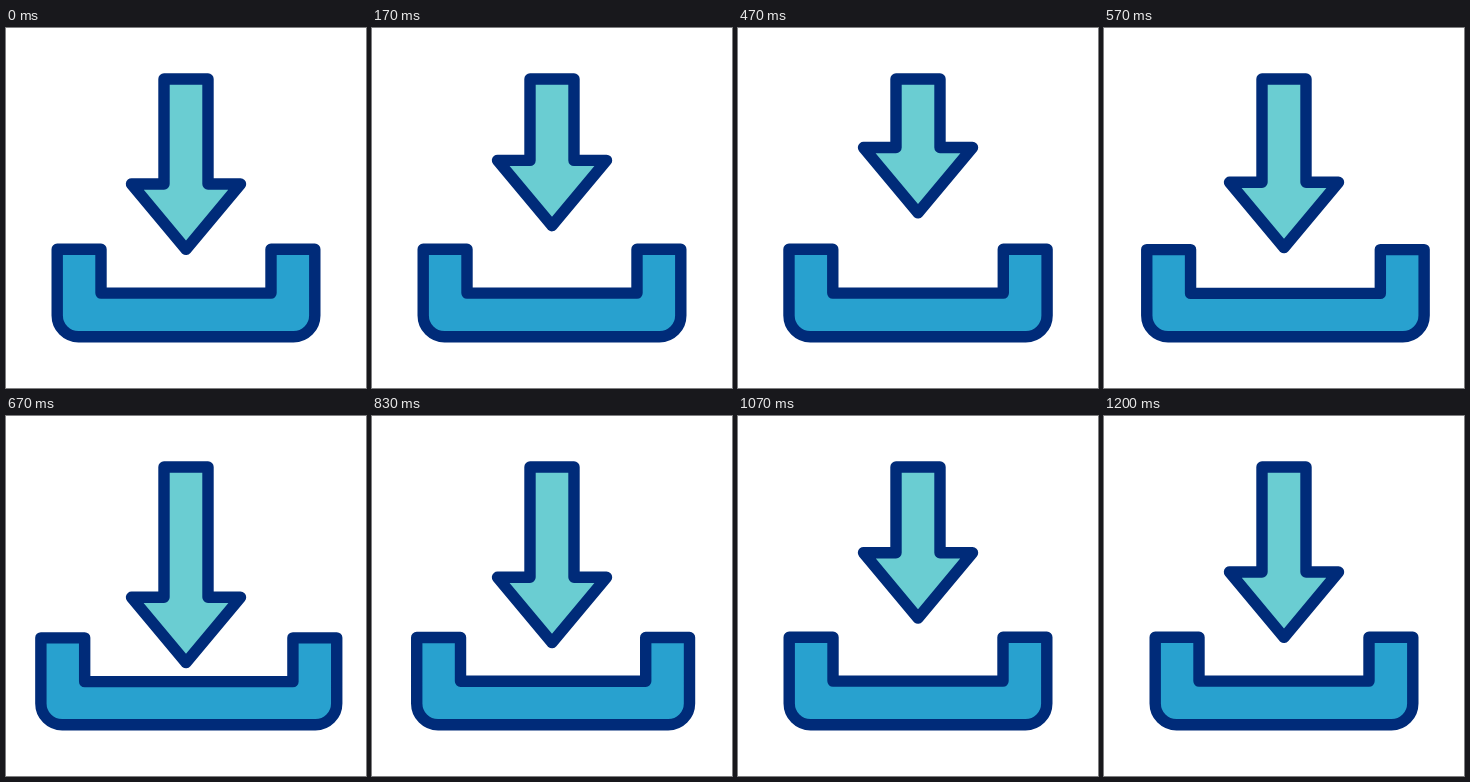
An HTML page that plays this animation: 360 by 360 pixels, repeating every 1500 ms.

```html
<!DOCTYPE html>
<html>
<head>
<meta charset="utf-8">
<title>Download icon</title>
<style>
  html, body { margin: 0; width: 100%; height: 100%; overflow: hidden; background: #fff; }
  svg { display: block; width: 100vw; height: 100vh; }
  path { stroke: #002b79; stroke-width: 11.4; stroke-linejoin: round; }
</style>
</head>
<body>
<svg viewBox="0 0 360 360">
  <path id="tray" fill="#28a1cf"/>
  <path id="arrow" fill="#6acdd2"/>
</svg>
<script>
const LOOP = 1500, STEP = 100 / 3, LAST_STEP = 36;
const tray = document.getElementById('tray');
const arrow = document.getElementById('arrow');

const easeOut = p => Math.sin(p * Math.PI / 2);
const easeInOut = p => (1 - Math.cos(p * Math.PI)) / 2;
const power = n => p => p ** n;

// Each key is [step, value, easing used to reach it].
const arrowKeys = [[0, 156], [12, 117.2, easeOut], [18, 181.3, power(3)],
  [20, 181.3, easeInOut], [31, 134.7, easeInOut], [36, 156, easeInOut]];
const trayKeys = [[0, 0], [12, 0, easeInOut], [18, 1, power(4)],
  [30, 0, easeInOut], [36, 0, easeInOut]];

function valueAt(keys, step) {
  const i = Math.max(1, keys.findIndex(key => step <= key[0]));
  const [from, a] = keys[i - 1];
  const [to, b, ease] = keys[i];
  return a + (b - a) * ease((step - from) / (to - from));
}

function draw(time) {
  const step = Math.min(LAST_STEP, Math.floor((time % LOOP + 4) / STEP));
  const y = valueAt(arrowKeys, step);
  const spread = valueAt(trayKeys, step);
  const left = 51.2 - 17.5 * spread;
  const right = 308.8 + 23.5 * spread;
  const top = 221.3 + 0.6 * spread;

  arrow.setAttribute('d',
    `M158 51H202V${y}H234.5L180 ${y + 65.3}L125.5 ${y}H158Z`);
  tray.setAttribute('d',
    `M${left} ${top}h43.8v43.8H${right - 43.8}v-43.8h43.8V287.5` +
    `a21.3 21.3 0 0 1-21.3 21.3H${left + 21.3}a21.3 21.3 0 0 1-21.3-21.3Z`);
}

const start = performance.now();
function tick() {
  draw(performance.now() - start);
  requestAnimationFrame(tick);
}
tick();
</script>
</body>
</html>
```
